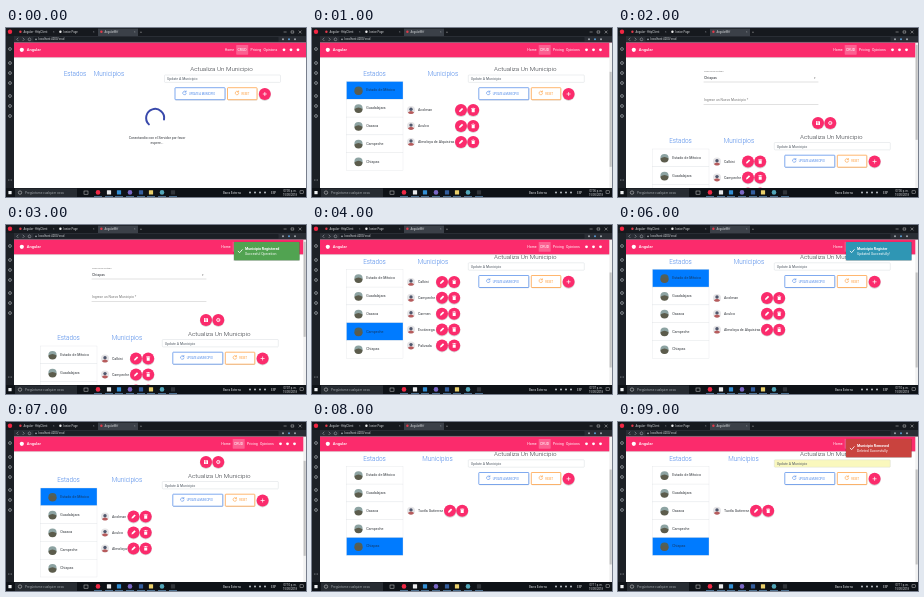
Recreate the animation shown at these times as an HTML page. Size 300 by 169 pixels, loop 10 s.

```html
<!DOCTYPE html>
<html lang="es">
<head>
<meta charset="utf-8">
<title>Municipios</title>
<style>
html, body { margin: 0; width: 100%; height: 100%; overflow: hidden; background: #fff; }
svg { display: block; width: 100vw; height: 100vh; }
text { font-family: Roboto, sans-serif; white-space: pre; }
.scene { display: none; }
.scene.on { display: inline; }
</style>
</head>
<body>
<svg id="stage" viewBox="0 0 300 169" preserveAspectRatio="none"></svg>
<script>
const STEP = 1000;
const PINK = '#fb2b6c', BLUE = '#4a86e8', INK = '#30343a';
const STATES = ['Estado de México', 'Guadalajara', 'Oaxaca', 'Campeche', 'Chiapas'];
const MEXICO = ['Acolman', 'Aculco', 'Almoloya de Alquisiras'];
const CAMPECHE = ['Calkini', 'Campeche', 'Carmen', 'Escárcega', 'Palizada'];
const ROW = 17.8;

const rect = (x, y, w, h, fill, extra = '') =>
  `<rect x="${x}" y="${y}" width="${w}" height="${h}" fill="${fill}" ${extra}/>`;
const dot = (x, y, r, fill, extra = '') => `<circle cx="${x}" cy="${y}" r="${r}" fill="${fill}" ${extra}/>`;
const line = (d, color, width = .6) =>
  `<path d="${d}" fill="none" stroke="${color}" stroke-width="${width}" stroke-linecap="round"/>`;
const text = (x, y, str, size, fill = INK, extra = '') =>
  `<text x="${x}" y="${y}" font-size="${size}" fill="${fill}" ${extra}>${str}</text>`;
const mid = (x, y, str, size, fill, extra = '') => text(x, y, str, size, fill, `text-anchor="middle" ${extra}`);
const at = (x, y, body) => `<g transform="translate(${x} ${y})">${body}</g>`;

const icons = {
  edit: '<path d="M-2 2l.4-1.7L1-2.2l1.2 1.2L-.4 1.6z" fill="#fff"/>',
  bin: '<path d="M-1.5-1h3v3.2h-3zM-2-2h1.2l.4-.4h.8l.4.4H2v.6h-4z" fill="#fff"/>',
  plus: line('M-1.6 0H1.6M0-1.6V1.6', '#fff', .7),
  save: '<path d="M-2-2h3.2l.8.8V2h-4z" fill="#fff"/>' + rect(-1.3, -1.5, 2, 1, PINK) + dot(0, .8, .65, PINK),
  gear: dot(0, 0, 1.6, 'none', 'stroke="#fff" stroke-width=".9"') + dot(0, 0, .5, '#fff')
};
const round = (x, y, icon) => at(x, y, dot(0, .7, 6.2, '#000', 'opacity=".16"') + dot(0, 0, 6, PINK) + icons[icon]);

function outlineButton(x, y, w, label, color) {
  return rect(x + .4, y + .8, w, 12, '#000', 'opacity=".13" rx=".8"') +
    rect(x, y, w, 12, '#fff', `rx=".6" stroke="${color}" stroke-width=".7"`) +
    at(x + 9.5, y + 5.2, line('M1.3-1.2A1.8 1.8 0 1 0 1.8.5M1.6-2V-.8H.4', color, .55)) +
    text(x + 14, y + 7, label, 2.65, color);
}

// Update panel: heading, text field and its three buttons
function updatePanel(x, y, value, field) {
  return mid(x, y + 2.2, 'Actualiza Un Municipio', 6.25, INK, 'font-weight="300"') +
    rect(x - 57, y + 6, 116, 7.4, field || '#fff', 'rx=".8" stroke="#ced4da" stroke-width=".4"') +
    text(x - 54.5, y + 11, value || 'Update A Municipio', 3.5, '#555e68') +
    outlineButton(x - 46.5, y + 18.7, 50, 'UPDATE A MUNICIPIO', BLUE) +
    outlineButton(x + 6, y + 18.7, 29.5, 'RESET', '#ff9933') +
    round(x + 43.3, y + 25, 'plus');
}

function stateList(y, active) {
  return STATES.map((name, i) => {
    const top = y + i * ROW, on = i === active;
    return rect(34.5, top, 56.5, ROW, on ? '#007bff' : '#fff', 'stroke="#dfe2e5" stroke-width=".35"') +
      dot(46.5, top + 9, 4.1, on ? '#50615b' : '#8da3a2') +
      `<path d="M42.5 ${top + 9.6}q4-3 8 0a4 4 0 0 1-8 0" fill="#5c5c4c"/>` +
      text(54.2, top + 9.8, name, 3.65, on ? '#17385f' : '#33383d');
  }).join('');
}

function townRows(names, first, editX) {
  return names.map((name, i) => {
    const y = first + i * 15.9;
    return dot(99, y, 4, '#e6e5e7') + dot(99, y - .9, 1.7, '#50586d') +
      `<path d="M95.8 ${y + 2.3}q3.2-3 6.4 0a4 4 0 0 1-6.4 0" fill="#b75b5c"/>` +
      text(106, y + 1.2, name, 3.6) + round(editX, y, 'edit') + round(editX + 12.2, y, 'bin');
  }).join('');
}

function navbar(shift) {
  const labels = [['Home', 215.3], ['CRUD', 228], ['Pricing', 241], ['Opinions', 254]];
  return rect(8, 14.5, 292, 14.8, PINK) + rect(8, 29.3, 292, .8, '#000', 'opacity=".13"') +
    dot(15.8, 21.8, 2.1, '#fff') + text(20.8, 23.3, 'Angular', 4.1, '#fff', 'font-weight="500"') +
    rect(226.7 + shift, 17, 12, 9.7, '#fff', 'opacity=".25" rx=".6"') +
    labels.map(([s, x]) => text(x + shift, 23, s, 3.5, '#fff')).join('') +
    [274.5, 281.5, 288.5].map(x => dot(x + shift, 21.8, 1.4, '#fff')).join('');
}

function toast({ color, title, body }) {
  return rect(227.5, 16.8, 66.5, 19.2, '#000', 'opacity=".22" rx="1"') +
    rect(228, 17, 65.5, 18.3, color, 'rx=".8"') +
    line('M232.2 26.2l1.4 1.5 2.6-3', '#fff', .8) +
    text(239, 24.7, title, 3.6, '#fff', 'font-weight="700"') +
    text(239, 29.8, body, 3.5, '#fff');
}

function scrollbar(y) {
  return rect(297.3, 14.5, 2.7, 145.5, '#f1f1f1') + rect(297.6, y, 2.1, 95, '#c1c1c1');
}

const entryForm = y =>
  text(86, y - 69, 'Seleccione Estado', 2.4, '#777') + text(86, y - 62, 'Chiapas', 3.6) +
  text(196, y - 62.3, '▾', 3, '#777') +
  line(`M86 ${y - 59}H200M86 ${y - 36.5}H200`, '#999', .3) +
  text(86, y - 40, 'Ingrese un Nuevo Municipio *', 3.4, '#777');

const saveButtons = y => round(200, y, 'save') + round(212.3, y, 'gear');

function loadingPage() {
  return mid(69, 47.5, 'Estados', 6.35, BLUE, 'font-weight="300"') +
    mid(103, 47.5, 'Municipios', 6.35, BLUE, 'font-weight="300"') + updatePanel(215.5, 41) +
    line('M142.9 96.4A9 9 0 1 1 158 91.5', '#3949ab', 2) +
    mid(151, 111, 'Conectandio con el Servidor por favor', 3.4) + mid(151, 116.2, 'espere...', 3.4) + navbar(3.5);
}

// y is the heading line of the two lists; everything scrolls with it
function crudPage({ y, active, towns, townY, editX, townTitle, form, saves, value, field, note }) {
  return (form ? entryForm(y) : '') + (saves ? saveButtons(y - 18) : '') +
    mid(62.5, y + 2.2, 'Estados', 6.35, BLUE, 'font-weight="300"') +
    mid(townTitle, y + 2.2, 'Municipios', 6.35, BLUE, 'font-weight="300"') +
    stateList(y + 8, active) + townRows(towns, y + townY, editX) +
    updatePanel(213.3, y - 4.5, value, field) +
    navbar(0) + scrollbar(62 - y * .4) + (note ? toast(note) : '');
}

const mexico = { active: 0, towns: MEXICO, townY: 36.6, editX: 149, townTitle: 131 };
const campeche = { active: 3, towns: CAMPECHE, townY: 20.6, editX: 130, townTitle: 121 };
const chiapas = { active: 4, towns: ['Tuxtla Gutierrez'], townY: 52.5, editX: 138, townTitle: 125.5 };
const registered = { color: '#51a351', title: 'Municipio Registered', body: 'Succesful Operation' };
const updated = { color: '#2f96b4', title: 'Municipio Register', body: 'Updated Succesfully!' };
const removed = { color: '#c9433e', title: 'Municipio Removed', body: 'Deleted Succesfully' };

const scenes = [
  ['07:05', loadingPage()],
  ['07:06', crudPage({ ...mexico, y: 45.5 })],
  ['07:06', crudPage({ ...campeche, y: 113, form: true, saves: true })],
  ['07:07', crudPage({ ...campeche, y: 113, form: true, saves: true, note: registered })],
  ['07:07', crudPage({ ...campeche, y: 36.3 })],
  ['07:08', crudPage({ ...mexico, y: 36.3 })],
  ['07:10', crudPage({ ...mexico, y: 36.3, note: updated })],
  ['07:10', crudPage({ ...mexico, towns: ['Acolman', 'Aculco', 'Almoloya'], editX: 127.5, townTitle: 121, y: 58, saves: true })],
  ['07:11', crudPage({ ...chiapas, y: 36.3 })],
  ['07:11', crudPage({ ...chiapas, y: 36.3, field: '#faf8bd', note: removed })]
];

function browserFrame() {
  const tabs = [['Angular - HttpClient', 11, '#e23b4b'], ['Ionice Page', 51, '#eee'], ['AngularWtf', 92, '#e23b4b']];
  const side = [21, 35, 45, 55, 68, 78, 88];
  return rect(0, 0, 300, 8, '#16191e') + rect(92, .6, 40, 7.4, '#3b4048') + rect(0, 8, 300, 6.5, '#292d34') +
    rect(0, 8, 8, 152, '#1c2026') + dot(4, 3.8, 2.2, '#f22643') +
    tabs.map(([s, x, c]) => dot(x + 3.4, 3.8, 1.2, c) + text(x + 6.4, 4.8, s, 2.75, '#d7d9dc') +
      text(x + 36, 4.8, '×', 2.7, '#90959c')).join('') +
    text(134, 5, '+', 3.5, '#aaa') +
    line('M278 4h2.2M285.5 2.9h2.2v2.2h-2.2zM293 2.9l2.2 2.2m0-2.2l-2.2 2.2', '#ddd', .45) +
    line('M12 10l-1.3 1.3 1.3 1.3M17 10l1.3 1.3-1.3 1.3M24.5 10.4a1.4 1.4 0 1 0 .4 1.2', '#b7bbc1', .5) +
    rect(27.5, 9, 245, 4.6, '#1b1f25', 'rx=".6"') + dot(30, 11.3, .9, '#9ba0a7') +
    text(32.5, 12.3, 'localhost:4200/crud', 2.9, '#d3d6da') +
    [277, 283, 289].map(x => dot(x, 11.3, 1, x === 283 ? '#5b9cd2' : '#a0a5ab')).join('') +
    side.map(y => dot(4, y, 1.4, 'none', 'stroke="#c2c6cc" stroke-width=".6"')).join('') +
    [2.4, 4, 5.6].map(x => dot(x, 152, .45, '#c2c6cc')).join('');
}

function taskbar() {
  const apps = [[92, '#ef2945'], [103, '#e9eaec'], [113, '#338fd5'], [124, '#7967c4'], [135, '#345e9e'],
    [145, '#ead06b'], [156, '#52a6b9'], [167, '#30343a']];
  return rect(0, 160, 300, 9, '#0e1217') + rect(2.4, 163, 3.2, 3.2, '#f0f2f4') +
    rect(9, 160.4, 62, 8.6, '#272c32') + dot(14, 164.6, 1.7, 'none', 'stroke="#ddd" stroke-width=".5"') +
    text(19, 165.7, 'Pregúntame cualquier cosa', 3.2, '#9ea3a8') +
    rect(78, 163, 4, 3.2, 'none', 'stroke="#ccc" stroke-width=".5"') +
    apps.map(([x, c], i) => (i % 3 ? rect(x - 2.1, 162.3, 4.2, 4.2, c, 'rx=".5"') : dot(x, 164.4, 2.3, c)) +
      rect(x - 4, 168.4, 8, .6, '#75aee0')).join('') +
    text(217, 165.6, 'Barra Externa', 3, '#d7dade') +
    [244, 249, 254, 259].map(x => dot(x, 164.6, 1, '#bbc0c5')).join('') +
    text(265, 165.7, 'ESP', 2.9, '#e0e2e5') + mid(284, 168, '15/05/2018', 2.65, '#e0e2e5') +
    rect(294, 162.8, 3.3, 2.8, 'none', 'stroke="#ccc" stroke-width=".45"');
}

const stage = document.getElementById('stage');
stage.innerHTML = rect(0, 0, 300, 169, '#fff') +
  scenes.map(([, page]) => `<g class="scene">${page}</g>`).join('') + browserFrame() + taskbar() +
  mid(284, 164, '', 2.65, '#e0e2e5', 'id="clock"');

const pages = [...stage.querySelectorAll('.scene')];
const clock = document.getElementById('clock');
const start = performance.now();
let shown = -1;

function draw() {
  const index = Math.floor((performance.now() - start) / STEP) % scenes.length;
  if (index !== shown) {
    pages.forEach((page, i) => page.classList.toggle('on', i === index));
    clock.textContent = scenes[index][0] + ' p. m.';
    shown = index;
  }
  requestAnimationFrame(draw);
}
draw();
</script>
</body>
</html>
```
